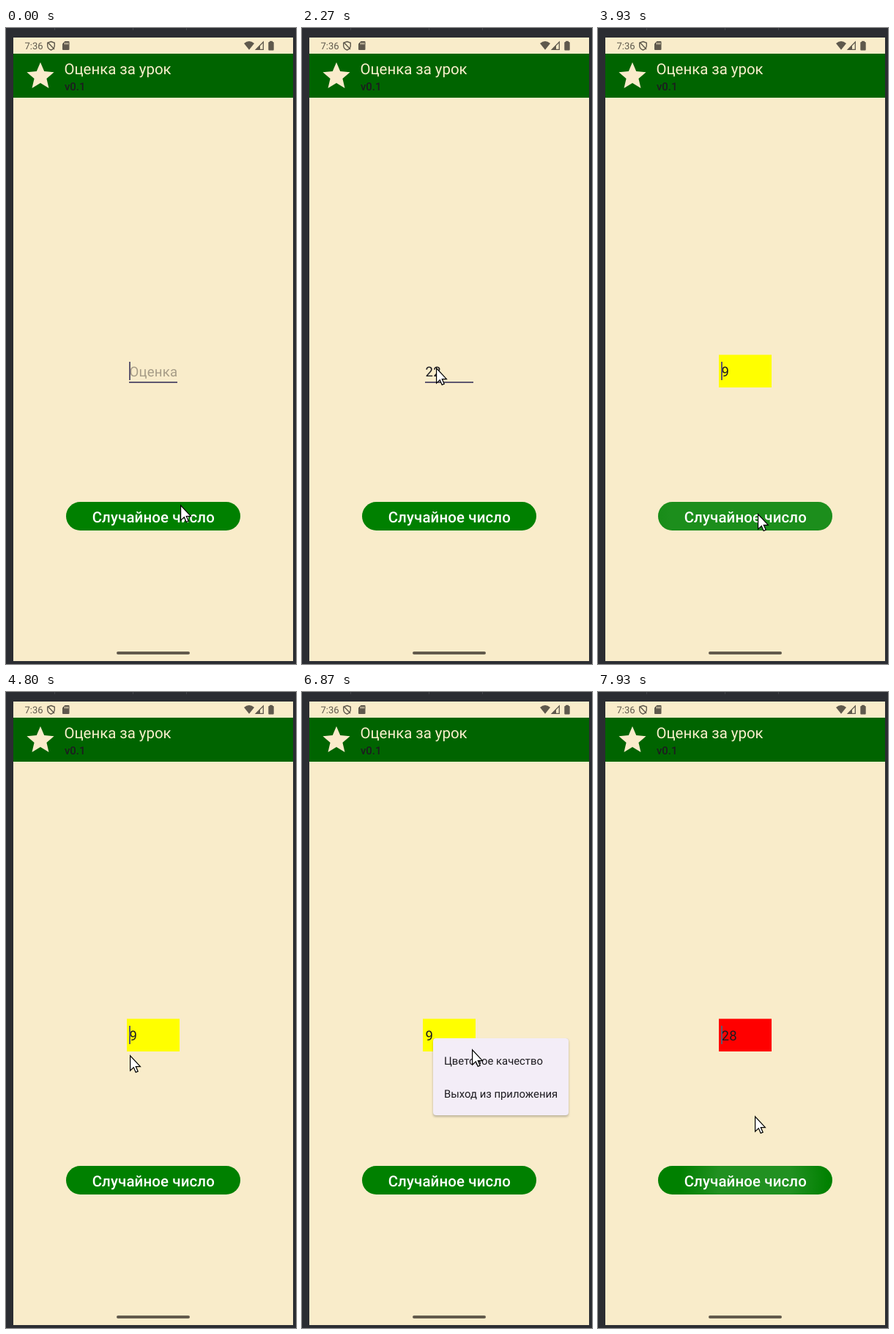
Recreate the animation shown at these times as an HTML page. Size 396 px wide and 867 px high, loop 8000 ms.

```html
<!DOCTYPE html>
<html lang="ru">
<head>
<meta charset="utf-8">
<style>
  html, body { margin: 0; width: 100%; height: 100%; overflow: hidden; background: #2b2d32; }
  svg { display: block; width: 100%; height: 100%; font-family: Roboto, sans-serif; text-rendering: geometricPrecision; }
  #popup { filter: drop-shadow(0 0 .6px rgba(0, 0, 0, .2)) drop-shadow(0 2px 1.5px rgba(0, 0, 0, .25)); }
</style>
</head>
<body>
<svg viewBox="0 0 396 867">
  <defs>
    <radialGradient id="glow">
      <stop offset=".5" stop-color="#fff" stop-opacity=".13"/>
      <stop offset="1" stop-color="#fff" stop-opacity="0"/>
    </radialGradient>
    <clipPath id="pill"><rect x="82" y="646" width="238" height="39" rx="19.5"/></clipPath>
  </defs>

  <path d="M66.5 0v3M173.5 0v3M246.5 0v3" stroke="#43454a"/>
  <rect x="10" y="13" width="382" height="850" fill="#f9ecca"/>

  <!-- status bar -->
  <g fill="#5f594d">
    <text x="25.5" y="28.7" font-size="13">7:36</text>
    <path d="M61.5 18.5l4.8 1.8v3.7c0 3-2 5-4.8 6-2.800-1-4.800-3-4.800-6v-3.700zM57 19.500l9 9.500" fill="none" stroke="#5f594d" stroke-width="1.4"/>
    <path d="M80.500 18h5q1 0 1 1v10q0 1-1 1h-7.500q-1 0-1-1v-7.500z"/>
    <path d="M80.500 20v2.500m2-2.500v2.500m2-2.500v2.500" stroke="#f9ecca"/>
    <path d="M325 21q7-6 14 0l-7 8.800z"/>
    <path d="M351.300 19v10.300h-10z" fill="none" stroke="#5f594d" stroke-width="1.3"/>
    <path d="M347 23.500v6h-6z"/>
    <rect x="360" y="17.800" width="4" height="3"/>
    <rect x="358.300" y="19" width="7.400" height="11.500" rx="1"/>
  </g>

  <!-- app bar -->
  <rect x="10" y="35" width="382" height="60" fill="#006400"/>
  <path transform="translate(24.700 43) scale(1.858)" fill="#faebcb"
    d="M12 17.270L18.180 21l-1.640-7.030L22 9.240l-7.190-.610L12 2 9.190 8.630 2 9.240l5.460 4.730L5.820 21z"/>
  <text x="79.500" y="63" font-size="20.400" fill="#faf0cc">Оценка за урок</text>
  <text x="80" y="84.500" font-size="14.900" font-weight="500" fill="#1d1b20">v0.1</text>

  <!-- grade field -->
  <rect id="line" x="168" y="482" width="66" height="2" fill="#5f5870"/>
  <rect id="fill" x="165" y="445.500" width="72" height="44.500"/>
  <text id="value" x="168.500" y="474.500" font-size="18.600" letter-spacing=".2"></text>
  <rect id="caret" x="168" y="455" width="2" height="25" fill="#5f5870"/>

  <!-- button -->
  <g clip-path="url(#pill)">
    <rect x="82" y="646" width="238" height="39" fill="#008000"/>
    <circle id="ripple" fill="url(#glow)"/>
  </g>
  <text x="201.300" y="673.500" font-size="20.400" font-weight="500" letter-spacing=".14" text-anchor="middle" fill="#fff">Случайное число</text>

  <rect x="151" y="850" width="100" height="4" rx="2" fill="#625a4c"/>

  <g id="popup" font-size="14.860" fill="#1d1b20">
    <rect width="185" height="105" rx="4" fill="#f3edf7"/>
    <text x="15" y="36">Цветовое качество</text>
    <text x="15" y="80.500">Выход из приложения</text>
  </g>

  <path id="mouse" d="M.6 .8V21.200L5.300 16.800 8.200 23.400 11.200 22.200 8.300 15.600H14.400Z" fill="#fff" stroke="#000" stroke-width="1.2"/>
</svg>
<script>
const LOOP = 8000, FADE = 120;
const el = id => document.getElementById(id);
const set = (id, attrs) => {
  for (const key in attrs) el(id).setAttribute(key, attrs[key]);
};
const clamp = v => Math.max(0, Math.min(1, v));
const ease = k => k * k * (3 - 2 * k);

// pointer glides: start, end, x, y
const glides = [
  [0, 350, 300, 660], [350, 1000, 214, 674], [1550, 2050, 183, 463],
  [2720, 3000, 241, 494], [3140, 3530, 225, 688], [3600, 3670, 218, 662],
  [3980, 4300, 195, 447], [4300, 4650, 169, 495], [5200, 5730, 179, 472],
  [6420, 6800, 232, 487], [6930, 7400, 214, 667], [7820, 7930, 214, 578]
];
const taps = [
  { at: 1270, value: '22' },
  { at: 3670, value: '9' },
  { at: 7760, value: '28' }
];
const menus = [
  { open: 2720, close: 3150, fill: '#ff0' },
  { open: 6420, close: 6940, fill: '#f00' }
];

const before = (list, key, t) => list.filter(item => item[key] <= t).pop();

function pointer(t) {
  let x = 238, y = 650;
  for (const [start, end, toX, toY] of glides) {
    const k = ease(clamp((t - start) / (end - start)));
    x += (toX - x) * k;
    y += (toY - y) * k;
  }
  return [x, y];
}

function drawField(t, value, fill) {
  el('value').textContent = value || 'Оценка';
  set('value', { fill: value ? '#1d1b20' : '#a69c87' });
  set('fill', { fill: fill || 'none' });
  set('line', { opacity: fill ? 0 : 1 });
  // the caret stops blinking while a menu is open
  const menu = menus.find(m => t >= m.open && t < m.close);
  const clock = menu ? menu.open : t;
  set('caret', { opacity: (clock + 300) % 1000 < 500 ? 1 : 0 });
}

function drawRipple(t, tap) {
  if (!tap) return set('ripple', { r: 0 });
  const age = t - tap.at, [cx, cy] = pointer(tap.at);
  set('ripple', {
    cx, cy,
    r: Math.min(age * age * .0035, 260),
    opacity: clamp(age / 75) * clamp((740 - age) / 560)
  });
}

function drawPopup(t) {
  const menu = before(menus, 'open', t);
  if (!menu) return set('popup', { opacity: 0 });
  set('popup', {
    transform: `translate(${pointer(menu.open)})`,
    opacity: clamp((t - menu.open) / FADE) * clamp((menu.close + FADE - t) / FADE)
  });
}

function draw(t) {
  const tap = before(taps, 'at', t), choice = before(menus, 'close', t);
  drawField(t, tap?.value, choice?.fill);
  drawRipple(t, tap);
  drawPopup(t);
  set('mouse', { transform: `translate(${pointer(t)})` });
}

function frame() {
  draw(performance.now() % LOOP);
  requestAnimationFrame(frame);
}
frame();
</script>
</body>
</html>
```
